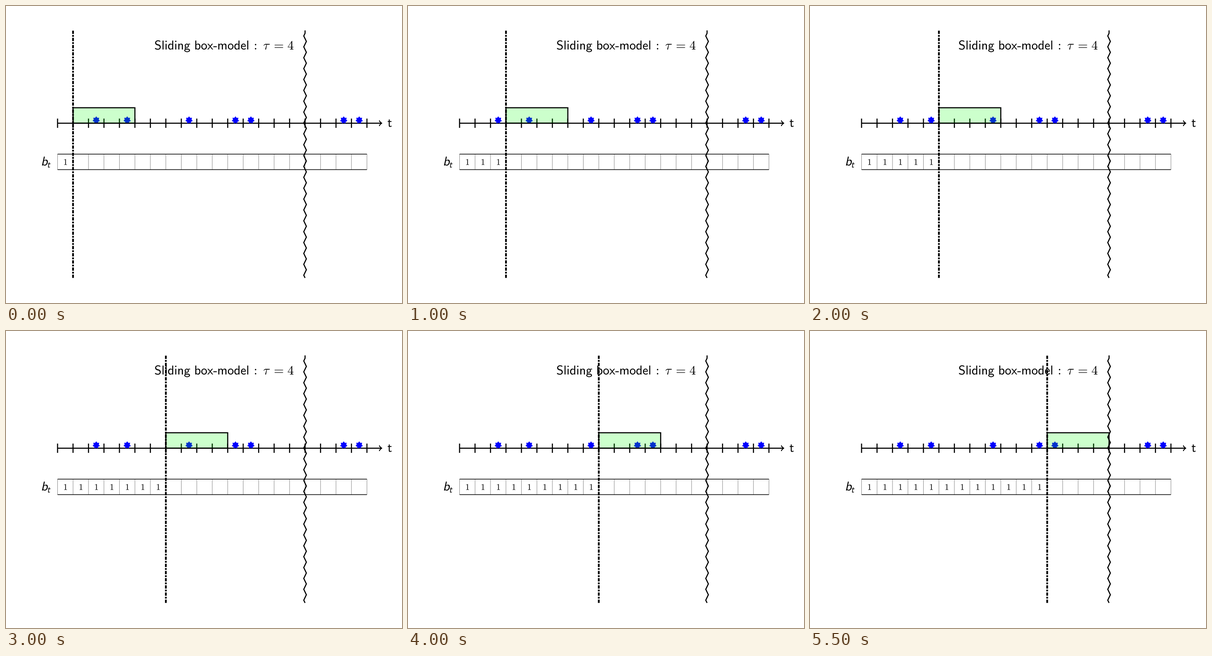
Animation of 864x648 px, one loop 6000 ms. Source, as a matplotlib script:

```python
import numpy as np
import matplotlib.pyplot as plt
from matplotlib.animation import FuncAnimation
from matplotlib.patches import PathPatch, Polygon, Rectangle
from matplotlib.path import Path
from matplotlib.textpath import TextPath
from matplotlib.transforms import Affine2D

plt.rcParams["mathtext.fontset"] = "cm"
plt.rcParams["path.snap"] = False

WIDTH, HEIGHT, DPI = 864, 648, 100
PT = WIDTH / 364.2          # pixels per typographic point
UNIT = 33.75                # width of one time step
LEFT, AXIS_Y = 112.5, 255.75
TOP, BOTTOM = AXIS_Y - 6 * UNIT, AXIS_Y + 10 * UNIT
ROW_TOP, ROW_BOTTOM = AXIS_Y + 2 * UNIT, AXIS_Y + 3 * UNIT
STEPS, TAU, FRAMES = 20, 4, 12
EVENTS = (2, 4, 8, 11, 12, 18, 19)

fig = plt.figure(figsize=(WIDTH / DPI, HEIGHT / DPI), dpi=DPI, facecolor="white")
ax = fig.add_axes([0, 0, 1, 1])
ax.set_xlim(0, WIDTH)
ax.set_ylim(HEIGHT, 0)
ax.axis("off")


def grid_x(step):
    return LEFT + step * UNIT


def line(xs, ys, pts=1, color="black", **style):
    style = {"solid_capstyle": "butt", "solid_joinstyle": "miter", **style}
    return ax.plot(xs, ys, color=color, lw=pts * PT * 72 / DPI, **style)[0]


def text(content, left, baseline, size=28, slant=0):
    """Draw math text whose ink starts at `left`."""
    flip = Affine2D([[1, slant, 0], [0, -1, 0], [0, 0, 1]])
    glyphs = TextPath((0, 0), f"${content}$", size=size).transformed(flip)
    move = Affine2D().translate(left - glyphs.get_extents().x0, baseline)
    patch = PathPatch(glyphs.transformed(move), fc="black", lw=0, zorder=6)
    return ax.add_patch(patch)


def sans(content, *args, **kwargs):
    return text(rf"\mathsf{{{content}}}", *args, **kwargs)


def star(x, y, points=7, outer=8.3, inner=5.6):
    angles = np.pi / 2 + np.arange(2 * points) * np.pi / points
    radii = np.where(np.arange(2 * points) % 2, inner, outer)
    corners = np.column_stack([x + radii * np.cos(angles), y - radii * np.sin(angles)])
    ax.add_patch(Polygon(corners, fc="blue", lw=0, zorder=3))


def draw_title():
    base = 95
    sans("Sliding", 325, base)
    sans("box", 413, base)
    ax.add_patch(Rectangle((452.4, base - 7.2), 7.4, 2, fc="black", lw=0))
    sans("model", 463.2, base)
    sans(":", 543, base)
    text(r"\tau", 561.8, base)
    text("=", 586, base)
    sans("4", 614.8, base)


def draw_axis():
    tip_x, d = 819.9, 0.58 * PT
    line([LEFT, tip_x], [AXIS_Y, AXIS_Y])
    for step in range(STEPS + 1):
        line([grid_x(step)] * 2, [AXIS_Y - 0.3 * UNIT, AXIS_Y + 0.3 * UNIT])
    offsets = np.array([(-3.75, 4), (-3.5, 2.5), (-0.75, 0.25), (0, 0),
                        (-0.75, -0.25), (-3.5, -2.5), (-3.75, -4)])
    head = Path(offsets * d + (tip_x, AXIS_Y), [Path.MOVETO] + [Path.CURVE4] * 6)
    ax.add_patch(PathPatch(head, fc="none", ec="black", lw=0.8 * PT * 72 / DPI,
                           capstyle="round", joinstyle="round", zorder=2))
    sans("t", 832.8, 263.8)
    for event in EVENTS:
        star(grid_x(event + 0.5), AXIS_Y - 0.2 * UNIT)


def draw_row():
    for step in range(STEPS + 1):
        line([grid_x(step)] * 2, [ROW_TOP, ROW_BOTTOM], 0.38, "#808080", zorder=1)
    for y in (ROW_TOP, ROW_BOTTOM):
        line([LEFT, grid_x(STEPS)], [y, y], 0.6)
    sans("b", 78.5, 348.2, slant=0.2126)
    sans("t", 91.3, 352.5, size=19.5, slant=0.2126)


def draw_zigzag():
    x, segment, amplitude = grid_x(16), 10 * PT, 1.2 * PT
    k = np.arange(int((BOTTOM - TOP) / (segment / 2)))
    xs = x + np.where(k % 2, amplitude, -amplitude)
    ys = BOTTOM - (k + 0.5) * segment / 2
    end = BOTTOM - len(k) * segment / 2
    line([x, *xs, x, x], [BOTTOM, *ys, end, TOP], zorder=5)


draw_title()
draw_axis()
draw_row()
draw_zigzag()

ones = [sans("1", grid_x(i) + 14.2, 346.6, size=19) for i in range(FRAMES)]
box_fill = ax.add_patch(Rectangle((0, AXIS_Y - UNIT), TAU * UNIT, UNIT,
                                  fc=(0, 1, 0, 0.2), lw=0, zorder=4))
box_edge = ax.add_patch(Rectangle((0, AXIS_Y - UNIT), TAU * UNIT, UNIT, fc="none",
                                  ec="black", lw=PT * 72 / DPI, zorder=4.5))
cursor = line([0, 0], [BOTTOM, TOP], 1.6, zorder=5,
              linestyle=(0, (3 / 1.6, 1 / 1.6, 1, 1 / 1.6)), dash_capstyle="butt")


def update(frame):
    x = grid_x(frame + 1)
    cursor.set_xdata([x, x])
    box_fill.set_x(x)
    box_edge.set_x(x)
    for i, one in enumerate(ones):
        one.set_visible(i <= frame)
    return [cursor, box_fill, box_edge, *ones]


anim = FuncAnimation(fig, update, frames=FRAMES, interval=500,
                     repeat=True, repeat_delay=0, blit=False)
plt.show()
```
